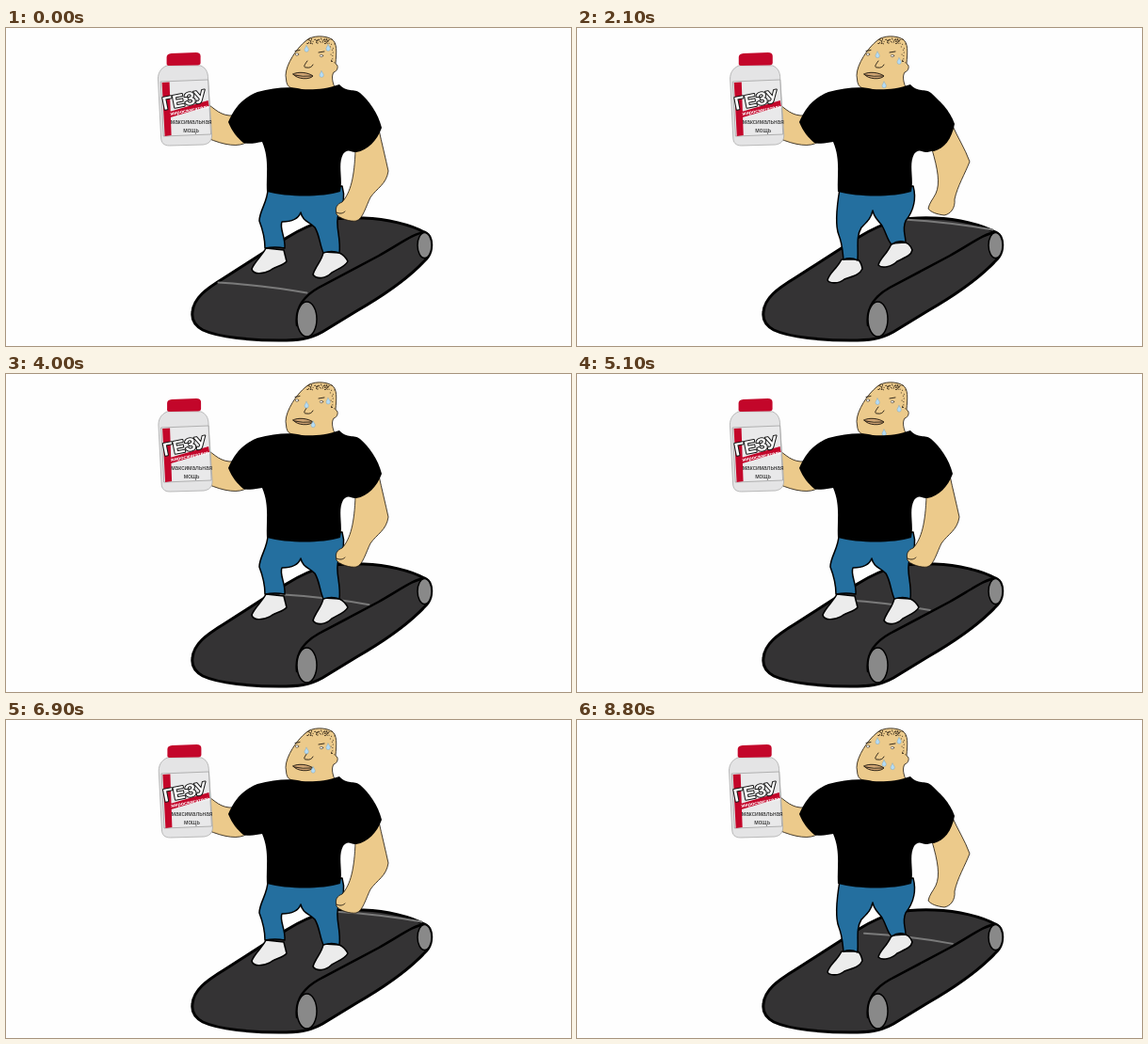
Animation of 600 by 338 pixels, one loop 8900 ms. Source, as an HTML page:

```html
<!DOCTYPE html>
<html lang="ru">
<head>
<meta charset="utf-8">
<style>
  html, body { margin: 0; width: 100%; height: 100%; overflow: hidden; background: #fefefe; }
  svg { display: block; width: 100%; height: 100%; }
  .skin { fill: #ecca8b; stroke: #1a140c; stroke-width: .8; }
  .pants { fill: #246f9f; stroke: #000; stroke-width: 1.5; }
  .shoe { fill: #ececec; stroke: #000; stroke-width: 1.6; }
  .roller { fill: #898989; stroke: #000; stroke-width: 1.5; }
  .thin { fill: none; stroke: #20180f; stroke-width: .9; }
  .drop { fill: #b5dcf5; stroke: #7fa9c4; stroke-width: .5; }
  text { font-family: "Liberation Sans", Arial, sans-serif; }
</style>
</head>
<body>
<svg viewBox="0 0 600 338" stroke-linejoin="round" stroke-linecap="round">
  <!-- Treadmill -->
  <path fill="#343334" stroke="#000" stroke-width="3" d="M198 302C199 287 213 277 231 266L298 223C330 203 350 201 380 202C405 203 430 209 444 217C451 219 453 228 451 237C449 244 446 246 443 249C425 268 398 286 372 301L336 323C322 331 310 332 290 332C262 332 226 329 209 321C200 316 197 309 198 302Z"/>
  <path id="mark" d="M227.500 269.500q50 3 94 11" fill="none" stroke="#7a7a7a" stroke-width="2"/>
  <path fill="none" stroke="#000" stroke-width="2.5" d="M309 316C307 300 314 286 332 276L396 242C422 227 434 218 445 217"/>
  <ellipse class="roller" cx="319.500" cy="309.500" rx="10.5" ry="18.5"/>
  <ellipse class="roller" cx="444.5" cy="231" rx="7.5" ry="13.5"/>

  <!-- Walker: two alternating poses -->
  <g id="stand">
    <path class="shoe" d="M276 234C272 242 264 248 261 256C262 262 272 262 280 258C286 253 294 253 298 248L295 236Z"/>
    <path class="shoe" d="M337 238C336 247 328 254 326 262C330 268 340 266 346 260C352 256 360 254 363 248C360 242 356 240 354 239Z"/>
    <path class="pants" d="M278 171C278 185 269 194 269 205C274 218 275 226 275 234Q286 232 296 234C297 222 290 213 293 206C302 206 310 204 313 196C315 206 323 206 328 212C333 220 333 230 337 239Q346 236 354 239C356 222 349 210 353 198C359 188 360 178 357 168Z"/>
    <path class="skin" d="M396 108C399 122 403 138 406 152C404 166 394 170 387 180C382 190 379 203 372 205C366 206 355 203 351 198C349 190 352 187 357 185C366 175 370 158 371 130Z"/>
    <path class="thin" d="M351 196C355 198 358 197 360 195"/>
  </g>
  <g id="step">
    <path class="shoe" d="M281 246C276 256 268 260 266 268C268 272 278 272 284 267C292 264 300 263 303 256C302 250 300 247 298 246Z"/>
    <path class="shoe" d="M334 229C330 240 322 244 320 252C324 256 334 254 340 248C348 244 355 242 356 236C354 230 350 228 348 228Z"/>
    <path class="pants" d="M279 171C275 195 274 210 278 220C282 230 282 238 283 246Q291 243 298 247C299 232 296 222 302 212C308 206 312 203 314 194C316 204 322 205 325 212C329 220 330 226 334 230Q342 225 349 228C349 220 345 214 349 205C356 196 361 183 357 168Z"/>
    <path class="skin" d="M398 102C404 116 412 128 417 142C412 155 404 168 401 182C402 192 396 198 390 199C382 198 376 196 373 192C374 186 378 182 381 176C386 165 383 150 377 129Z"/>
  </g>
  <path class="skin" d="M212 79C222 86 228 94 242 93L256 121C248 127 232 125 214 117Z"/>
  <path class="skin" d="M297 50C297 39 309 21 318 14C325 7 340 8 346 12C352 16 351 25 350 38C354 40 352 46 348 47C345 52 347 58 350 66L314 68C311 64 300 67 298 58Z"/>
  <path id="stubble" stroke="#3a2c1a" stroke-width="1" fill="none"/>
  <path class="thin" d="M320 35C317 39 315 42 319 42Q324 43 326 39M307 24.500l5-1M332 26l6-1"/>
  <g fill="#fff" stroke="#20180f" stroke-width=".5">
    <ellipse cx="309" cy="28" rx="1.7" ry="1.3"/>
    <ellipse cx="335" cy="29.500" rx="1.7" ry="1.3"/>
  </g>
  <path fill="#d0a473" stroke="#20180f" stroke-width=".9" d="M305 49C309 46 321 47 326 51C323 55 309 55 305 49ZM306 50Q315 52 325 51"/>
  <g id="drops">
    <path id="drop" class="drop" d="M0-3.2C1.500-1 2.300 0 2.300 1.200A2 2 0 0 1-2 1.200C-2 0-1-1 0-3.200Z"/>
  </g>
  <path d="M314 65C304 62 285 63 267 68C252 74 243 84 236 100C240 110 246 117 252 122C258 124 266 122 272 121C280 140 276 155 277 174C300 180 335 180 355 174C358 160 352 145 358 134C364 127 366 133 372 132C384 130 394 120 399 106C395 90 386 78 376 69C370 64 362 69 354 60C340 65 325 66 314 65Z"/>
  <path id="sleeve" d="M371 68C386 76 396 88 401 102C398 118 390 128 379 131L360 126Z"/>

  <!-- Bottle -->
  <g id="bottle">
    <path fill="#e4e4e5" stroke="#aaa" stroke-width=".8" d="M170 40C163 43 160 49 161 57L164 116C164 122 167 125 173 125L209 124C215 123 218 120 218 114L214 54C214 46 211 42 206 40Z"/>
    <path fill="#c3062a" d="M170 31Q170 27.500 175 27L201 26Q206 26 206 30V37Q206 39 203 39.500L173 40Q170 40 170 38Z"/>
    <path fill="#e9e9ea" stroke="#999" stroke-width=".7" d="M164 57L214 55L217 113L167 115Z"/>
    <path fill="#c3062a" d="M165 58L173 57.500L175 114L168 115ZM173 89L214 77L215 83L174 95Z"/>
    <g transform="rotate(-11 167 88)">
      <text x="167" y="87" font-size="19" font-weight="bold" fill="#fff" stroke="#151515" stroke-width="2" paint-order="stroke">ГЕЗУ</text>
      <text x="173" y="94.300" font-size="5.500" font-weight="bold" fill="#fff">жиросжигатель</text>
    </g>
    <text x="196" y="102" font-size="6.500" text-anchor="middle" fill="#222">максимальная</text>
    <text x="196" y="110.500" font-size="6.500" text-anchor="middle" fill="#222">мощь</text>
  </g>
</svg>
<script>
const LOOP = 8900, FRAME = 100;
const $ = id => document.getElementById(id);
const move = (el, x, y) => el.setAttribute("transform", `translate(${x} ${y})`);
const show = (el, on) => { el.style.display = on ? "" : "none"; };

// Times are in frames; each drop is visible from `start` to `end` of its period
const drops = [
  { x: 319, y: 22, fall: 1, period: 14.6, start: 0, end: 14.6 },
  { x: 342, y: 21, fall: 2.2, period: 7.3, start: 0, end: 7.3 },
  { x: 326, y: 45, fall: 2.4, period: 7.3, start: 0.3, end: 7.3 },
  { x: 335, y: 49, fall: 1, period: 14.6, start: 0, end: 5 }
];
for (const d of drops) {
  d.el = $("drop").cloneNode();
  d.el.removeAttribute("id");
  $("drops").append(d.el);
}
$("drop").remove();

let seed = 7;
const random = () => (seed = seed * 16807 % 2147483647) / 2147483647;
let dots = "";
for (let i = 0; i < 75; i++) {
  const x = 320 + random() * 29;
  const depth = x > 344 ? 27 : 6;
  dots += `M${x} ${11 + random() * depth}h.1`;
}
$("stubble").setAttribute("d", dots);

function draw(now) {
  const n = Math.floor(now % LOOP / FRAME);

  const beat = n % 4.5;
  const stepping = beat >= 1.75 && beat < 4;
  show($("stand"), !stepping);
  show($("step"), stepping);
  show($("sleeve"), stepping);

  // The mark stops on the far edge before it starts again at the front
  const travel = Math.min(14 * (n % 11.76) - 2, 120);
  move($("mark"), travel, -0.55 * travel);
  move($("bottle"), 1.2 - 0.6 * Math.cos(2 * Math.PI * n / 5.9), 0);

  for (const d of drops) {
    const age = n % d.period;
    show(d.el, age >= d.start && age < d.end);
    move(d.el, d.x, d.y + d.fall * age);
  }
  requestAnimationFrame(draw);
}
requestAnimationFrame(draw);
</script>
</body>
</html>
```
